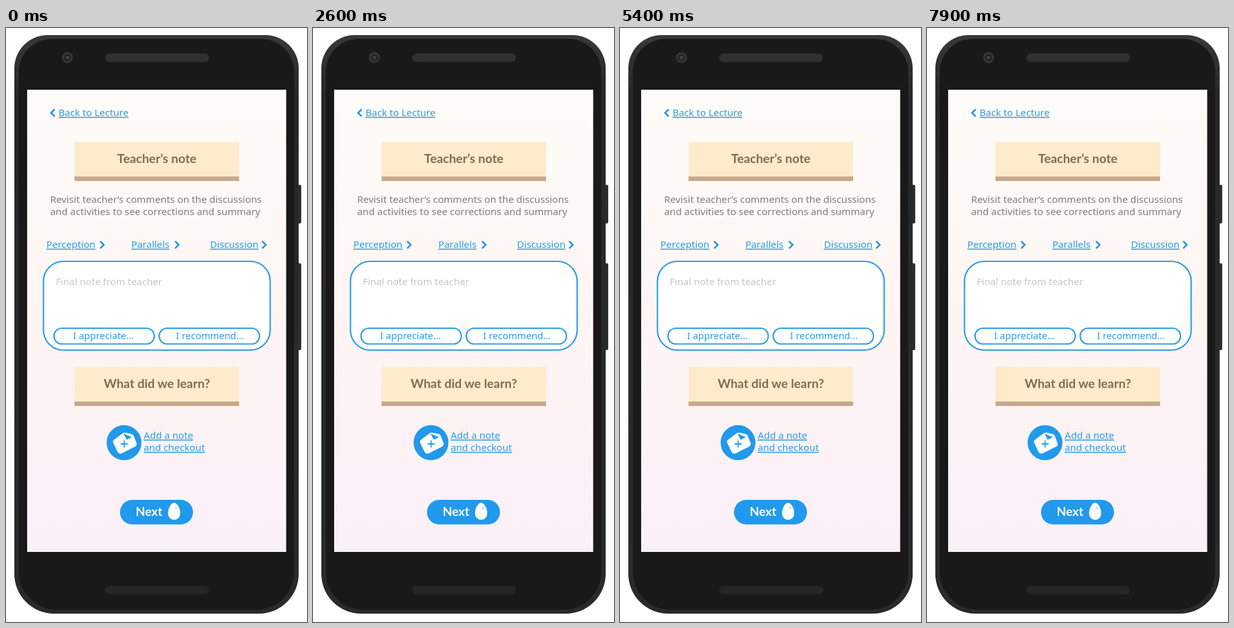
These frames come from a looping animation (470 by 924 pixels, 8000 ms). An HTML page:

```html
<!DOCTYPE html>
<html lang="en">
<head>
<meta charset="utf-8">
<title>Teacher's note</title>
<style>
  html, body { margin: 0; width: 100%; height: 100%; overflow: hidden; background: #fff; }
  svg { display: block; width: 100vw; height: 100vh; }
  text { font: 15.15px "Noto Sans", "Open Sans", sans-serif; fill: #2b9de6; }
  .link { text-decoration: underline; text-decoration-thickness: 1px; }
  .title { font: 700 19.4px Lato, sans-serif; fill: #866853; text-anchor: middle; }
  .body { font-size: 15.25px; fill: #807b7a; }
  .hint { fill: #c6c6c6; }
  .pill-text { font-size: 14.9px; }
  .next { font: 700 19.2px Lato, sans-serif; fill: #fff; }
  .outline { fill: #fff; stroke: #2b9de6; stroke-width: 2.2; }
  .arrow { fill: none; stroke: #2196e6; stroke-width: 2.6; }
  .blue { fill: #2199ec; }
</style>
</head>
<body>
<svg viewBox="0 0 470 924" preserveAspectRatio="none">
  <defs>
    <linearGradient id="screen" x2="0" y2="1">
      <stop offset="0" stop-color="#fefcf8"/>
      <stop offset=".5" stop-color="#fef5f3"/>
      <stop offset="1" stop-color="#fbf0f8"/>
    </linearGradient>
    <linearGradient id="rim" x2="0" y2="1">
      <stop offset="0" stop-color="#383838"/>
      <stop offset=".1" stop-color="#282828"/>
      <stop offset="1" stop-color="#2a2a2a"/>
    </linearGradient>
    <g id="banner">
      <rect width="257" height="61" fill="#fdebcb"/>
      <rect y="54" width="257" height="7" fill="#c9a88a"/>
    </g>
    <rect id="speaker" x="155" width="162" height="13.5" rx="6.7"/>
    <path id="chevron" class="arrow" d="M0 -5.6L5.6 0L0 5.6"/>
  </defs>

  <!-- Phone -->
  <path d="M455 244h4q2 0 2 2v56q0 2-2 2H455zM455 366h4q2 0 2 2v131q0 2-2 2H455z" fill="#2e2e2e"/>
  <path d="M13 63A52 52 0 0 1 65 11H405A52 52 0 0 1 457 63V849A62 62 0 0 1 395 911H75A62 62 0 0 1 13 849Z" fill="url(#rim)"/>
  <path d="M20 68A51 51 0 0 1 71 17H399A51 51 0 0 1 450 68V846A59 59 0 0 1 391 905H79A59 59 0 0 1 20 846Z" fill="#191919"/>
  <use href="#speaker" y="39.5" fill="#303030"/>
  <use href="#speaker" y="867.5" fill="#262626"/>
  <circle cx="96" cy="46" r="8.5" fill="#383838"/>
  <circle cx="96" cy="46" r="5.5" fill="#202022"/>
  <circle cx="96" cy="46" r="2.7" fill="#434349"/>
  <rect x="33" y="96" width="404.5" height="719" fill="url(#screen)"/>

  <!-- Heading -->
  <use href="#chevron" transform="translate(76 132) scale(-1 1)"/>
  <text class="link" x="82" y="137.3">Back to Lecture</text>
  <use href="#banner" x="107" y="177"/>
  <text class="title" x="235.5" y="209.5">Teacher’s note</text>
  <text class="body" x="69" y="272">Revisit teacher’s comments on the discussions</text>
  <text class="body" x="69" y="291">and activities to see corrections and summary</text>

  <!-- Sections -->
  <text class="link" x="63" y="342.3">Perception</text>
  <use href="#chevron" x="147" y="337.3"/>
  <text class="link" x="195.7" y="342.3">Parallels</text>
  <use href="#chevron" x="264" y="337.3"/>
  <text class="link" x="318.5" y="342.3">Discussion</text>
  <use href="#chevron" x="400" y="337.3"/>

  <!-- Comment box -->
  <rect class="outline" x="58.5" y="363" width="354" height="138" rx="31"/>
  <text class="hint" x="77.7" y="400.3">Final note from teacher</text>
  <rect class="outline" x="75" y="467" width="156.5" height="24.5" rx="12.2"/>
  <rect class="outline" x="239.3" y="467" width="156.5" height="24.5" rx="12.2"/>
  <text class="pill-text" x="104.8" y="484.4">I appreciate...</text>
  <text class="pill-text" x="265.6" y="484.4">I recommend...</text>

  <use href="#banner" x="107" y="527"/>
  <text class="title" x="235.5" y="559.5">What did we learn?</text>

  <!-- Add a note -->
  <circle class="blue" cx="184.3" cy="645" r="27.2"/>
  <path d="M168 641L182 630.5Q184 629 187 629.5L196 631.5Q198.5 632 199.5 634.5L203.8 645.5Q205 649.5 201 651.5L181 661.5Q176.5 663.5 174.2 659.5L167.3 645Q166.3 642.5 168 641Z" fill="#fff"/>
  <path class="blue" d="M183.5 631L196.5 636.5L188.5 640.5Z"/>
  <path d="M184.5 641.5V652.5M179 647H190" fill="none" stroke="#2199ec" stroke-width="1.8"/>
  <text class="link" x="215" y="639.2">Add a note</text>
  <text class="link" x="215" y="658.4">and checkout</text>

  <!-- Next button -->
  <rect class="blue" x="178" y="734" width="114" height="38.3" rx="19.1"/>
  <text class="next" x="202.5" y="759.2">Next</text>
  <path d="M262.5 738.5C267.5 738.5 272 747.5 272 754.5C272 761 268 765 262.5 765S253 761 253 754.5C253 747.5 257.5 738.5 262.5 738.5Z" fill="#fff"/>
  <ellipse cx="265.4" cy="746.5" rx="1.5" ry="2.3" transform="rotate(-25 265.4 746.5)" fill="#b9ddf8"/>
</svg>
</body>
</html>
```
